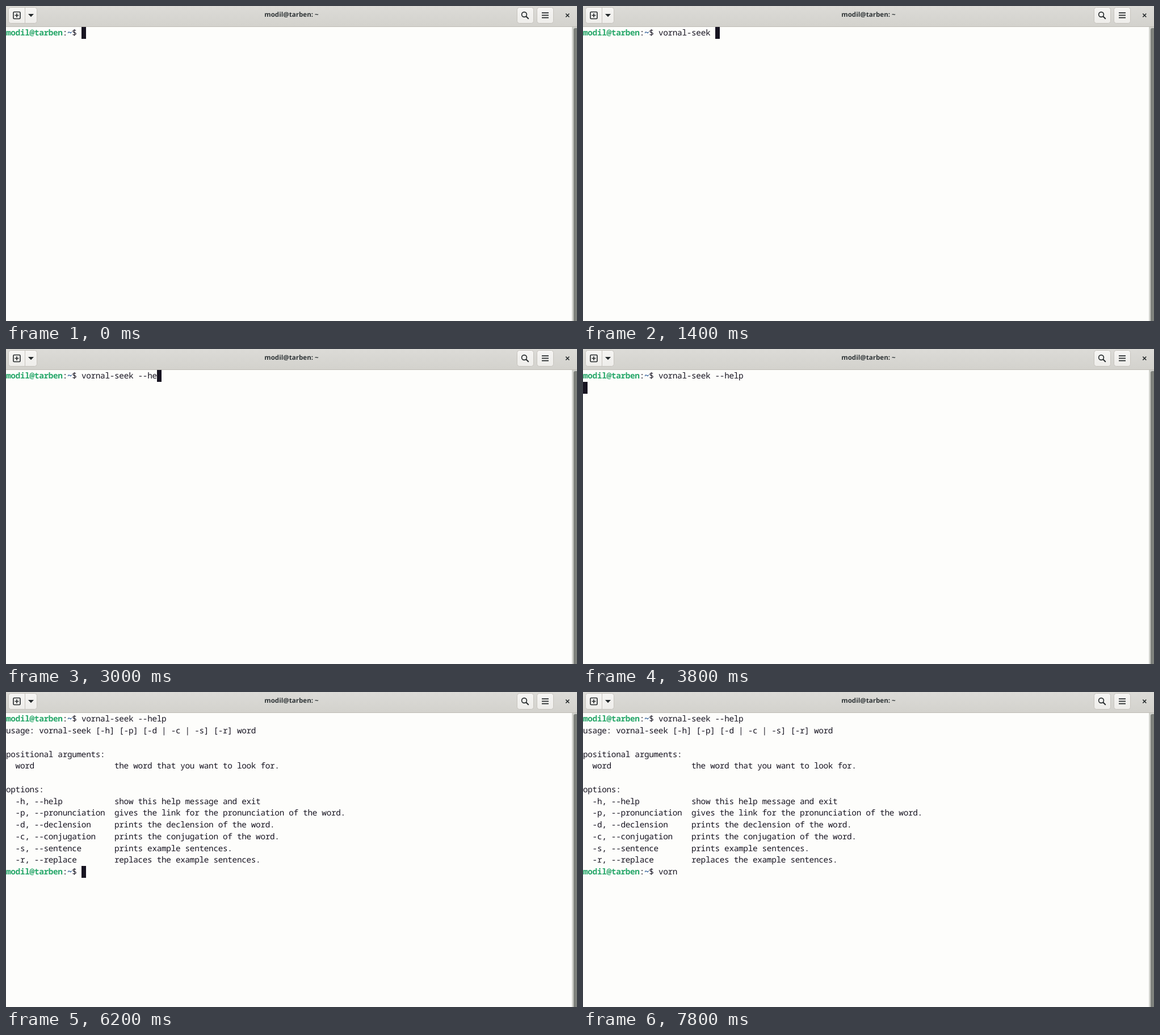
Animation, 1006 px wide and 556 px high, one loop 8 s. Source, as an HTML page:

```html
<!DOCTYPE html>
<html lang="en">
<head>
<meta charset="utf-8">
<title>Terminal</title>
<style>
html, body { margin: 0; width: 100%; height: 100%; overflow: hidden; background: #fdfdfb; }
#bar { position: absolute; left: 0; top: 0; }
#title {
  position: absolute; left: 0; top: 6px; width: 1006px; text-align: center; color: #2e3436;
  font: bold 11.6px/20px "Noto Sans", sans-serif; text-rendering: geometricPrecision;
}
#screen {
  position: absolute; left: 0; top: 38.3px; margin: 0; color: #171421;
  font: 14.4px/20.77px "Noto Sans Mono", monospace;
  letter-spacing: calc(8.304px - 1ch); text-rendering: geometricPrecision;
}
#screen .user { color: #26a769; }
#screen .path { color: #12488b; }
#cursor { position: absolute; width: 8.3px; height: 20.77px; background: #171421; }
</style>
</head>
<body>
<svg id="bar" width="1006" height="556">
  <defs>
    <linearGradient id="head" x2="0" y2="1"><stop stop-color="#dcdbd7"/><stop offset="1" stop-color="#d3d2cd"/></linearGradient>
    <linearGradient id="face" x2="0" y2="1"><stop stop-color="#f6f5f3"/><stop offset="1" stop-color="#eeedea"/></linearGradient>
  </defs>
  <rect width="1006" height="36" fill="url(#head)"/>
  <rect y="36" width="1006" height="1" fill="#bfbcb5"/>
  <g fill="url(#face)" stroke="#c6c3bd">
    <rect x="4.5" y="2.5" width="50" height="28" rx="4"/>
    <rect x="900.5" y="2.5" width="29" height="28" rx="4"/>
    <rect x="935.5" y="2.5" width="29" height="28" rx="4"/>
    <path d="M33.5 3v27"/>
  </g>
  <g fill="none" stroke="#24292b" stroke-width="1.6">
    <rect x="13" y="10.5" width="12" height="12" rx="1.5"/>
    <path d="M15.5 16.5h7M19 13v7"/>
    <circle cx="913" cy="15" r="4.4"/>
    <path d="M916.2 18.2l4.6 4.6" stroke-width="2"/>
    <path d="M944 12.2h12M944 16.4h12M944 20.6h12" stroke-width="1.7"/>
    <path d="M986.3 13.5l6 6M992.3 13.5l-6 6" stroke-width="1.7"/>
  </g>
  <path d="M39 14h10l-5 5.2z" fill="#24292b"/>
  <rect x="997" y="37" width="9" height="519" fill="#d0d1cc"/>
  <path d="M1000 556V42q0-3 3-3h3v517z" fill="#7e817d"/>
</svg>
<div id="title">modil@tarben: ~</div>
<div id="cursor"></div>
<pre id="screen"></pre>
<script>
const LOOP = 8000, CELL = 8.304, LINE = 20.77, TOP = 37.3;
const PROMPT = '<b class="user">modil@tarben</b>:<b class="path">~</b>$ ', PROMPT_LEN = 16;
const TOOL = 'vornal-seek', COMMAND = TOOL + ' --help';
const option = (flags, text) => ('  ' + flags).padEnd(23) + text;
const HELP = [
  `usage: ${TOOL} [-h] [-p] [-d | -c | -s] [-r] word`,
  '',
  'positional arguments:',
  option('word', 'the word that you want to look for.'),
  '',
  'options:',
  option('-h, --help', 'show this help message and exit'),
  option('-p, --pronunciation', 'gives the link for the pronunciation of the word.'),
  option('-d, --declension', 'prints the declension of the word.'),
  option('-c, --conjugation', 'prints the conjugation of the word.'),
  option('-s, --sentence', 'prints example sentences.'),
  option('-r, --replace', 'replaces the example sentences.')
];
const RUN = 3800, DONE = 4400;
// [time, characters typed]
const FIRST = [[0, 0], [1000, 2], [1200, 4], [1400, 12], [2200, 13], [2600, 14], [3000, 16], [3200, 18]];
const SECOND = [[DONE, 0], [7000, 2], [7200, 3], [7400, 4]];
// times at which the cursor vanishes or appears, starting visible
const BLINKS = [400, 1000, DONE, 5000, 5600, 6200, 6800, 7000, 7800];

const screen = document.getElementById('screen');
const cursor = document.getElementById('cursor');
const typed = (keys, t) => keys.filter(k => k[0] <= t).pop()[1];
let shown = '';

function draw(t) {
  const done = t >= DONE;
  const count = typed(done ? SECOND : FIRST, t);
  const input = PROMPT + COMMAND.slice(0, count);
  const text = done ? [PROMPT + COMMAND, ...HELP, input].join('\n') : input;
  if (text !== shown) screen.innerHTML = shown = text;

  const waiting = t >= RUN && !done;
  const row = done ? HELP.length + 1 : +waiting;
  const col = waiting ? 0 : PROMPT_LEN + count;
  cursor.style.left = col * CELL + 'px';
  cursor.style.top = TOP + row * LINE + 'px';
  cursor.style.visibility = BLINKS.filter(b => b <= t).length % 2 ? 'hidden' : 'visible';
}

const start = performance.now();
function tick() {
  draw((performance.now() - start) % LOOP);
  requestAnimationFrame(tick);
}
tick();
</script>
</body>
</html>
```
